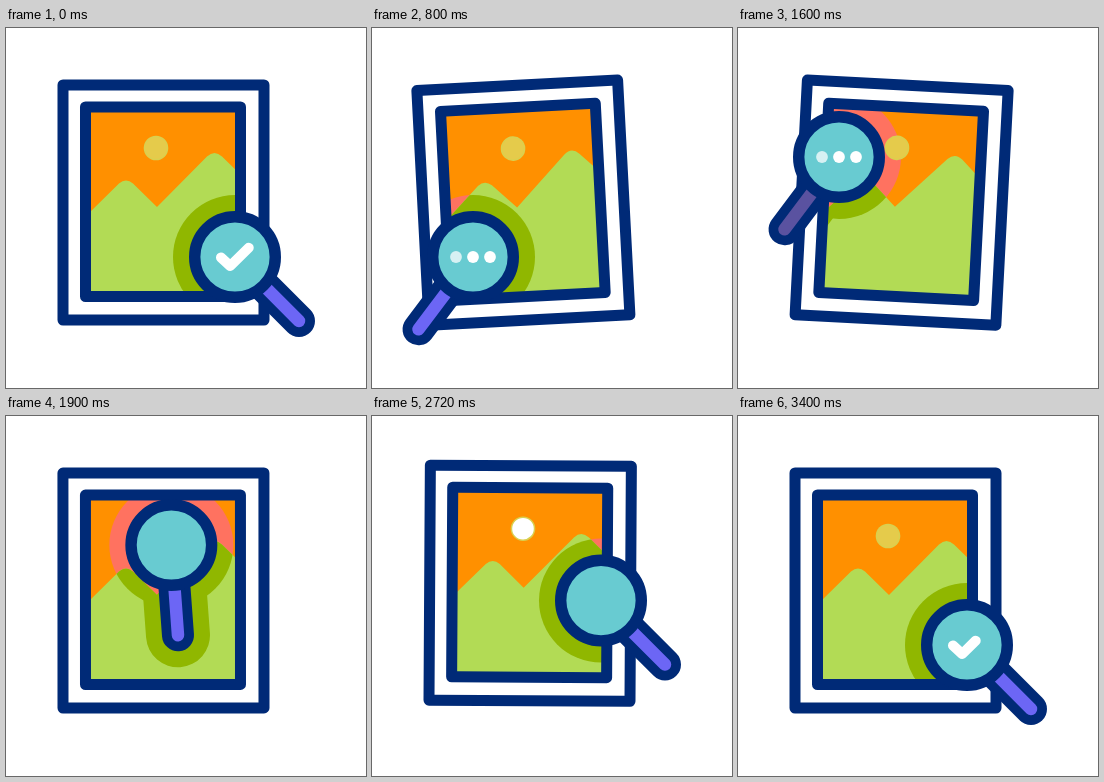
These frames come from a looping animation (360 px wide and 360 px high, 3.42 s). An HTML page without scripts:

```html
<!DOCTYPE html>
<html lang="en">
<head>
<meta charset="utf-8">
<title>Picture check</title>
<style>
  @property --x { syntax: "<length>"; inherits: true; initial-value: 229px; }
  @property --y { syntax: "<length>"; inherits: true; initial-value: 229px; }
  @property --turn { syntax: "<angle>"; inherits: true; initial-value: -45deg; }
  @property --tilt { syntax: "<angle>"; inherits: true; initial-value: 0deg; }
  @property --rise { syntax: "<length>"; inherits: true; initial-value: 0px; }

  :root {
    --loop: 3420ms;
    --navy: #002a77;
    --ease: cubic-bezier(.37, 0, .63, 1);
  }
  html, body { margin: 0; width: 100%; height: 100%; overflow: hidden; background: #fff; }
  svg {
    display: block; width: 100%; height: 100%;
    animation: travel var(--loop) var(--ease) infinite, hop var(--loop) var(--ease) infinite;
  }

  .frame, .unframe { transform-origin: 157.5px 291.5px; }
  .frame { transform: translateY(var(--rise)) rotate(var(--tilt)); }
  .unframe { transform: rotate(calc(-1 * var(--tilt))) translateY(calc(-1 * var(--rise))); }
  .at-lens { transform: translate(var(--x), var(--y)); }
  .turned { transform: rotate(var(--turn)); }

  .border { fill: none; stroke: var(--navy); stroke-width: 11; stroke-linejoin: round; }
  .sun { fill: #e5cb4b; animation: flash var(--loop) step-end infinite; }
  .glow { stroke-width: 64; stroke-linecap: round; }
  .handle { stroke-linecap: round; }
  .grip { stroke: #6c66f5; animation: grip var(--loop) linear infinite; }
  .dots circle { fill: #fff; opacity: 0; animation: dot var(--loop) linear infinite; }
  .dots circle:nth-child(2) { animation-delay: 100ms; }
  .dots circle:nth-child(3) { animation-delay: 200ms; }
  .check {
    fill: none; stroke: #fff; stroke-width: 10; stroke-linecap: round; stroke-linejoin: round;
    stroke-dasharray: 1 2;
    animation: draw var(--loop) linear infinite;
  }

  /* Corner to corner: 600 ms of travel, 200 ms of rest */
  @keyframes travel {
    0% { --x: 229px; --y: 229px; --turn: -45deg; --tilt: 0deg; }
    17.544%, 23.392% { --x: 101px; --y: 229px; --turn: 37deg; --tilt: -3deg; }
    40.936%, 46.784% { --x: 101px; --y: 129px; --turn: 37deg; --tilt: 3deg; }
    64.327%, 70.175% { --x: 229px; --y: 129px; --turn: -45deg; --tilt: -3deg; }
    87.719% { --x: 229px; --y: 229px; --turn: -45deg; --tilt: 3deg; }
    96.491%, 100% { --x: 229px; --y: 229px; --turn: -45deg; --tilt: 0deg; }
  }
  @keyframes hop {
    0%, 70.175% { --rise: 0px; }
    81.871%, 87.719% { --rise: -8px; }
    96.491%, 100% { --rise: 0px; }
  }
  @keyframes dot {
    0%, 9.94% { opacity: 0; }
    11.11%, 22.81% { opacity: 1; }
    25.15%, 33.33% { opacity: 0; }
    34.5%, 46.2% { opacity: 1; }
    48.54%, 56.73% { opacity: 0; }
    57.89%, 69.59% { opacity: 1; }
    71.93%, 100% { opacity: 0; }
  }
  @keyframes draw {
    0% { stroke-dashoffset: 0; }
    4%, 96.2% { stroke-dashoffset: 1.3; }
    100% { stroke-dashoffset: 0; }
  }
  @keyframes flash {
    0% { fill: #e5cb4b; }
    78.36% { fill: #fff; }
    80.7%, 100% { fill: #e5cb4b; }
  }
  @keyframes grip {
    0%, 24% { stroke: #6c66f5; }
    32.16% { stroke: #7785ac; }
    46.78% { stroke: #5a52a0; }
    55%, 100% { stroke: #6c66f5; }
  }
</style>
</head>
<body>
<svg viewBox="0 0 360 360">
  <defs>
    <path id="hills" d="M80 188L113 155.5Q120 149.5 127 155.5L151 179L201 128.5Q208.5 121.5 216 128.5L235 147V268H80Z"/>
    <clipPath id="window"><rect x="80" y="79" width="154" height="189"/></clipPath>
    <clipPath id="land"><use href="#hills"/></clipPath>
    <g id="halo" class="glow">
      <circle r="62" stroke="none"/>
      <path class="turned" d="M0 0V90.5"/>
    </g>
  </defs>

  <g class="frame">
    <rect x="57" y="57" width="201" height="235" class="border"/>
    <rect x="80" y="79" width="154" height="189" fill="#ff9000"/>
    <g clip-path="url(#window)">
      <g class="unframe"><g class="at-lens" fill="#ff7260" stroke="#ff7260"><use href="#halo"/></g></g>
    </g>
    <circle cx="150" cy="120" r="12.3" fill="#d9d04f"/>
    <circle class="sun" cx="150" cy="120" r="10.8"/>
    <use href="#hills" fill="#b2db55"/>
    <g clip-path="url(#land)">
      <g class="unframe"><g class="at-lens" fill="#90b700" stroke="#90b700"><use href="#halo"/></g></g>
    </g>
    <rect x="79.5" y="79" width="155" height="189.5" class="border"/>
  </g>

  <g class="at-lens">
    <g class="turned handle">
      <path d="M0 40V90.5" stroke="#002a77" stroke-width="32"/>
      <path class="grip" d="M0 42V90.5" stroke-width="12.5"/>
    </g>
    <circle r="40.3" fill="#68cbd1" stroke="#002a77" stroke-width="11.4"/>
    <g class="dots">
      <circle cx="-17" r="5.9"/>
      <circle r="5.9"/>
      <circle cx="17" r="5.9"/>
    </g>
    <path class="check" pathLength="1" d="M-14 .5L-4.8 9L14 -9.5"/>
  </g>
</svg>
</body>
</html>
```
